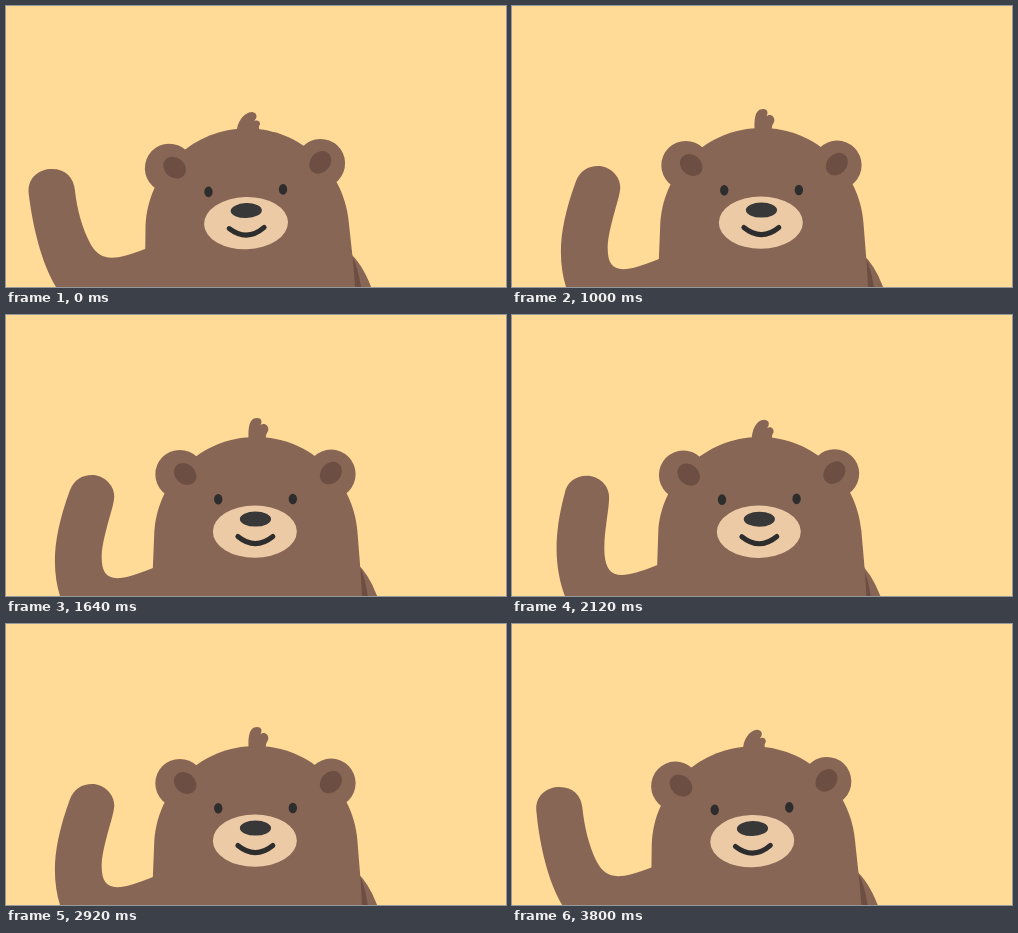
Recreate the animation shown at these times as an HTML page. Size 500x281 px, loop 3.84 s.

```html
<!DOCTYPE html>
<html lang="en">
<head>
<meta charset="utf-8">
<title>Waving bear</title>
<style>
  html, body { margin: 0; height: 100%; overflow: hidden; background: #ffdb97; }
  svg { display: block; width: 100vw; height: 100vh; }
  .fur { fill: #886655; }
  .shade { fill: #6d4e43; }
  .ink { fill: #2e2d2d; }
</style>
</head>
<body>
<svg viewBox="0 0 500 281" preserveAspectRatio="none">
  <path id="arm" class="fur"/>
  <g id="backArm">
    <path class="fur" d="M350 248Q363 259 372 284H345Z"/>
    <path class="shade" d="M353 251Q359 262 362 284H350Z"/>
  </g>
  <g id="bear">
    <path id="hair" class="fur"/>
    <circle class="fur" cx="174" cy="159.4" r="24.5"/>
    <circle class="fur" cx="325.3" cy="159.1" r="24.5"/>
    <path class="fur" d="M145 300L148.5 216C152 165 195 122 250 122C305 122 347 165 351.5 216L355 260L357 300Z"/>
    <ellipse class="shade" rx="12.2" ry="10" transform="translate(179.3 159) rotate(42)"/>
    <ellipse class="shade" rx="12.2" ry="10" transform="translate(325 158.1) rotate(-48)"/>
    <ellipse class="ink" cx="212.4" cy="184.3" rx="4.2" ry="5.3"/>
    <ellipse class="ink" cx="287" cy="184" rx="4.2" ry="5.3"/>
    <ellipse cx="249" cy="216.6" rx="42" ry="26.2" fill="#eccaa6"/>
    <ellipse cx="249.6" cy="204.1" rx="15.6" ry="7.5" fill="#383838"/>
    <path d="M232 221.5Q249.5 235.8 267 221.5" fill="none" stroke="#2e2d2d" stroke-width="5" stroke-linecap="round"/>
  </g>
</svg>
<script>
const PERIOD = 640, STEP = 40;
const HEAD_LEAD = 8, HAIR_LAG = 52, BACK_ARM_LAG = 30;
const $ = id => document.getElementById(id);

const ARM_OUT = 'M50 281C36 258 27 222 23 190C20 173 32 163 46 163C59 163 68 171 69 185C71 203 76 222 84.5 238C94 254.5 106 256 139 243L160 236L170 300L60 300Z';
const ARM_IN = 'M54 281C46 254 46 224 64 175C68 165 76 160 86 160C99 160 110 172 108 184C107 194 97 220 95.7 240C95 267 108 269 147 253L168 244L174 300L60 300Z';
const HAIR_UP = 'M243 126C242 114 243 103 251 103C257 103 256 108 254.5 110.5C258 107 263 110 262.5 115C262 118 259.5 118 260 126Z';
const HAIR_LEAN = 'M242 126C243 116 250 106 259 106C264 107 264.5 112 260.5 115C264 114 267 116 266 119C265 120 264.5 121 266 126Z';

// Blend two paths that share the same commands.
function blend(from, to, amount) {
  const ends = to.match(/[\d.]+/g);
  let i = 0;
  return from.replace(/[\d.]+/g, n => (+n + (ends[i++] - n) * amount).toFixed(2));
}

const swing = ms => (1 - Math.cos(ms / PERIOD * 2 * Math.PI)) / 2;
const lean = ms => `rotate(${-1.7 + 1.77 * swing(ms)} 262 520)`;

function draw(now) {
  const time = Math.floor(now / STEP) * STEP;
  $('arm').setAttribute('d', blend(ARM_OUT, ARM_IN, swing(time) * 1.04));
  $('hair').setAttribute('d', blend(HAIR_LEAN, HAIR_UP, swing(time - HAIR_LAG)));
  $('bear').setAttribute('transform', lean(time + HEAD_LEAD));
  $('backArm').setAttribute('transform', lean(time - BACK_ARM_LAG));
}

let start;
function tick(now) {
  start ??= now;
  draw(now - start);
  requestAnimationFrame(tick);
}
draw(0);
requestAnimationFrame(tick);
</script>
</body>
</html>
```
